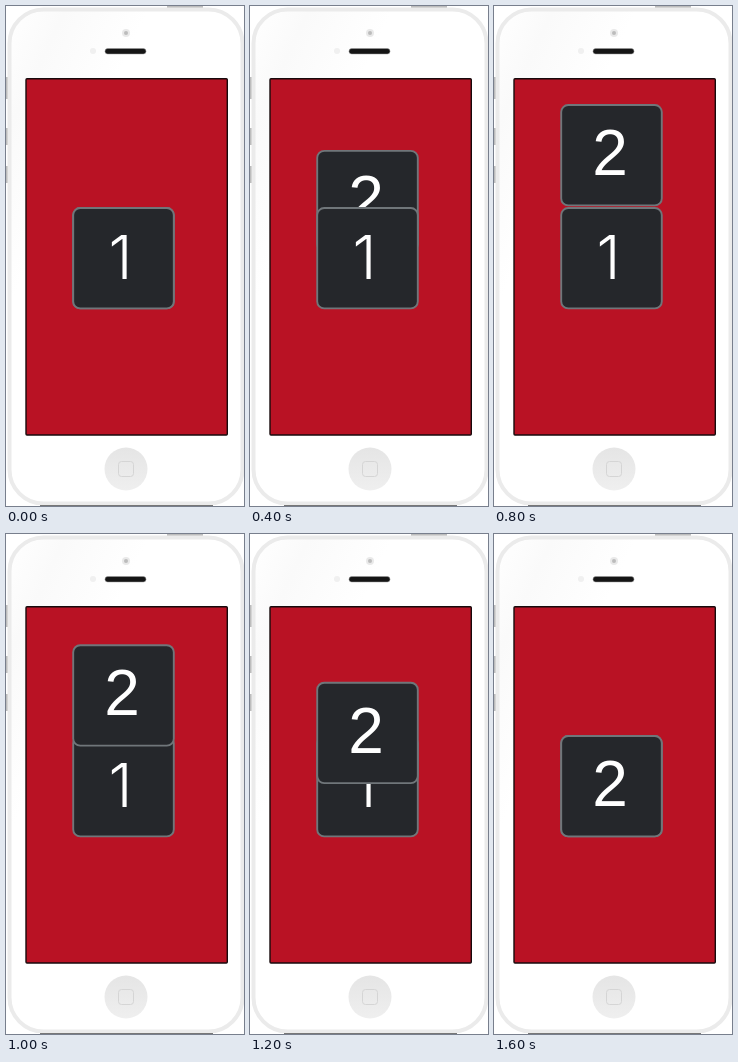
Animation of 238 by 500 pixels, one loop 2.6 s. Source, as an HTML page:

```html
<!DOCTYPE html>
<html lang="en">
<head>
<meta charset="utf-8">
<title>Card stack</title>
<style>
  html, body { margin: 0; width: 100%; height: 100%; overflow: hidden; background: #fff; }
  svg { display: block; width: 238px; height: 500px; }
  .card rect { fill: #25272b; stroke: #70767a; stroke-width: 1.9; }
  .card text { fill: #fff; text-anchor: middle; }
  .one { font: 300 61px Inter, sans-serif; }
  .two { font: 64px "Liberation Sans", Arial, sans-serif; }
</style>
</head>
<body>
<svg id="stage" viewBox="0 0 238 500">
  <defs>
    <linearGradient id="shell" x1="0" y1="0" x2="1" y2="1">
      <stop offset="0" stop-color="#fff"/>
      <stop offset=".12" stop-color="#fafafa"/>
      <stop offset=".3" stop-color="#fff"/>
    </linearGradient>
    <linearGradient id="button" x1="0" y1="0" x2="0" y2="1">
      <stop offset="0" stop-color="#e5e5e5"/>
      <stop offset="1" stop-color="#efefef"/>
    </linearGradient>
  </defs>

  <g id="phone">
    <path d="M161 0h36v2h-36zM0 71h2v22H0zM0 122h2v17H0zM0 160h2v17H0z" fill="#bdbdbd"/>
    <rect x="3.5" y="3.5" width="233" height="494" rx="34" fill="url(#shell)" stroke="#ebebeb" stroke-width="4"/>
    <path d="M34 499.5H207" stroke="#777"/>
    <circle cx="120" cy="27" r="4" fill="#e9e9e9"/>
    <circle cx="120" cy="27" r="2" fill="#bcbcbc"/>
    <circle cx="87" cy="45" r="3" fill="#f0f0f0"/>
    <rect x="99" y="42.5" width="41" height="5.5" rx="2.75" fill="#151515" stroke="#999" stroke-width=".5"/>
    <circle cx="120" cy="463" r="21.5" fill="url(#button)"/>
    <rect x="112.5" y="455.5" width="15" height="15" rx="3" fill="none" stroke="#d5d5d5"/>
    <rect x="20" y="72.7" width="201.3" height="356.3" rx="1" fill="#b91224" stroke="#170a0c" stroke-width="1.4"/>
  </g>

  <g id="cards">
    <g class="card" id="second">
      <rect x="67.2" y="202" width="100.6" height="100.4" rx="7"/>
      <text class="two" x="116" y="272">2</text>
    </g>
    <g class="card" id="first">
      <rect x="67.2" y="202" width="100.6" height="100.4" rx="7"/>
      <text class="one" x="114.5" y="272.5">1</text>
    </g>
  </g>
</svg>
<script>
const LOOP = 2600, STEP = 100, TRAVEL = 103;
const cards = document.getElementById('cards');
const first = document.getElementById('first');
const second = document.getElementById('second');

// cubic-bezier(.42, 0, .58, 1), solved by bisection
function easeInOut(x) {
  if (x <= 0) return 0;
  if (x >= 1) return 1;
  let low = 0, high = 1, u = 0.5;
  for (let i = 0; i < 20; i++) {
    u = (low + high) / 2;
    const v = 1 - u;
    const at = 1.26 * u * v * v + 1.74 * u * u * v + u * u * u;
    if (at < x) low = u; else high = u;
  }
  return u * u * (3 - 2 * u);
}

function liftAt(t) {
  if (t < 100) return 0;
  if (t < 800) return easeInOut((t + 151) / 1036);
  if (t < 1000) return 1;
  if (t < 1600) return 1 - easeInOut((t - 808) / 800);
  return 0;
}

function draw(now) {
  const t = Math.floor(now % LOOP / STEP) * STEP;
  const top = t < 900 ? first : second;
  if (cards.lastElementChild !== top) cards.append(top);
  second.setAttribute('transform', `translate(0 ${(-TRAVEL * liftAt(t)).toFixed(2)})`);
}

let start;
function tick(now) {
  start ??= now;
  draw(now - start);
  requestAnimationFrame(tick);
}
draw(0);
requestAnimationFrame(tick);
</script>
</body>
</html>
```
